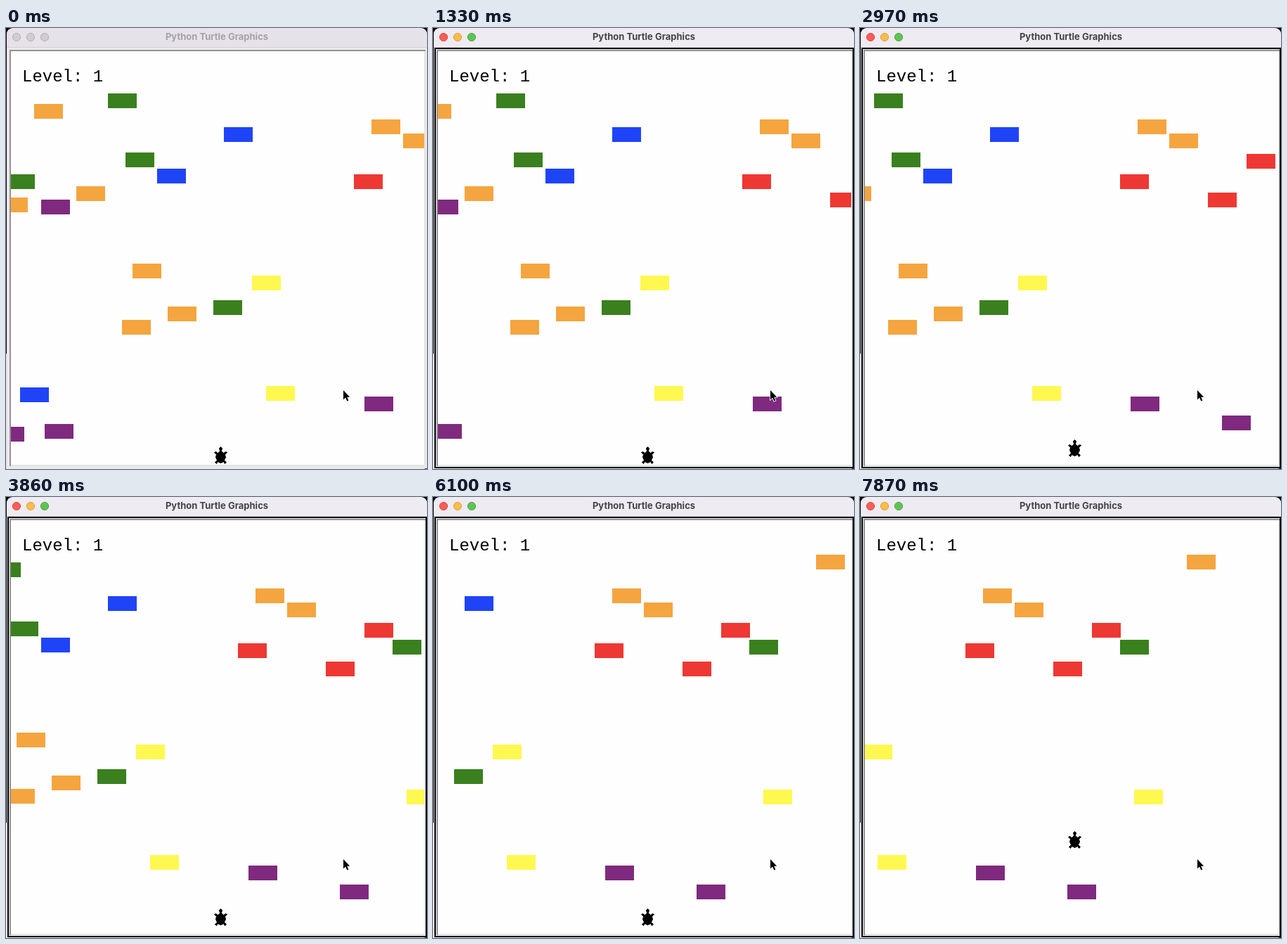
Animation, 599 px wide and 627 px high, one loop 8000 ms. Source, as an HTML page:

```html
<!DOCTYPE html>
<html lang="en">
<head>
<meta charset="utf-8">
<title>Turtle crossing</title>
<style>
  html, body { margin: 0; width: 100%; height: 100%; overflow: hidden; background: #000; }
  svg { display: block; width: 599px; height: 627px; }
  .chrome { fill: #e6e2ea; }
  .title { font: 700 13px Inter, sans-serif; text-anchor: middle; fill: #a5a1a7; }
  .level { font: 24px "Liberation Mono", "Courier New", monospace; white-space: pre; }
  .lights circle { fill: #d0ccd2; stroke: #b4b0b6; }
  .ring { fill: none; stroke: #ebe9eb; stroke-width: 2; }
  .active .chrome { fill: #eeebf2; }
  .active .title { fill: #454347; }
  .active .ring { stroke: #000; }
  .active .close { fill: #fd5d56; stroke: #de4a43; }
  .active .minimise { fill: #f8bd4c; stroke: #dba03a; }
  .active .zoom { fill: #5fc454; stroke: #4aa73f; }
</style>
</head>
<body>
<svg id="stage" viewBox="0 0 599 627">
  <defs>
    <clipPath id="view"><rect x="7" y="33" width="588" height="588"/></clipPath>
  </defs>

  <!-- window frame -->
  <rect y="463" width="2" height="164" fill="#dcdadd"/>
  <path d="M590 627L599 622V627Z" fill="#4a1d63"/>
  <path d="M1 627V10Q1 0 11 0H589Q599 0 599 10V621Q599 627 593 627Z" fill="#ebe9eb"/>
  <path class="chrome" d="M1 27V10Q1 0 11 0H589Q599 0 599 10V27Z"/>
  <path d="M1 27.5H599" stroke="#d5d2d7"/>
  <g class="lights">
    <circle class="close" cx="15" cy="13" r="5.6"/>
    <circle class="minimise" cx="35" cy="13" r="5.6"/>
    <circle class="zoom" cx="55" cy="13" r="5.6"/>
  </g>
  <text class="title" x="300" y="17">Python Turtle Graphics</text>
  <rect class="ring" x="3" y="29" width="595" height="596"/>
  <rect x="5" y="31" width="592" height="592" fill="#e4e3e4"/>
  <path d="M6 623V32H597" fill="none" stroke="#959395" stroke-width="2"/>
  <rect x="7" y="33" width="588" height="588" fill="#fefefe"/>

  <!-- game -->
  <g clip-path="url(#view)">
    <g id="cars" shape-rendering="crispEdges"></g>
    <path id="turtle" stroke="#000" d="M0-16L-2-14-1-10-4-7-7-9-9-8-6-5-7-1-5 3-8 6-6 8-4 5 0 7 4 5 6 8 8 6 5 3 7-1 6-5 9-8 7-9 4-7 1-10 2-14Z"/>
    <text class="level" x="23" y="76">Level: 1</text>
  </g>
  <path d="M480 515V528.4L483 525.6 485.3 530.6 487.4 529.7 485.2 524.7H489.2Z"
        stroke="#fff" stroke-width="1.6" paint-order="stroke"/>
</svg>
<script>
const LOOP = 8000, TICK = 148.6, STEP = 5, SPAWN_X = 580;

// colour: pairs of starting x and lane y
const lanes = {
  '#f4a53f': [[40, 108], [520, 130], [565, 150], [100, 225], [-10, 241],
              [180, 335], [230, 396], [165, 415], [810, 82]],
  '#3a801e': [[145, 93], [170, 177], [0, 208], [295, 387], [715, 203]],
  '#1f44f8': [[310, 141], [215, 200], [20, 511]],
  '#ee3833': [[495, 208], [620, 234], [675, 179]],
  '#fff850': [[350, 352], [370, 509], [735, 416]],
  '#7f2a7f': [[50, 244], [510, 524], [-15, 567], [55, 563], [640, 551]]
};

const stage = document.getElementById('stage');
const carLayer = document.getElementById('cars');
const turtle = document.getElementById('turtle');
const clamp = (v, lo, hi) => Math.min(hi, Math.max(lo, v));

function makeCar(fill, x, y) {
  const el = document.createElementNS(stage.namespaceURI, 'rect');
  const attrs = { x, y, width: 41, height: 21, fill };
  for (const key in attrs) el.setAttribute(key, attrs[key]);
  carLayer.append(el);
  return { el, x };
}

const cars = Object.entries(lanes).flatMap(([fill, spots]) =>
  spots.map(([x, y]) => makeCar(fill, x, y)));

function draw(time) {
  const tick = Math.floor((time + 9) / TICK);
  // four moves per three ticks, with a short slowdown near the start
  const moves = Math.floor(tick * 4 / 3 - 1.17 * clamp((tick - 4) / 10, 0, 1));
  for (const { el, x } of cars) {
    const left = x - moves * STEP;
    el.setAttribute('x', left);
    el.setAttribute('visibility', left > SPAWN_X ? 'hidden' : 'visible');
  }
  const hops = (tick >= 12 ? 1 : 0) + clamp(tick - 42, 0, 11);
  turtle.setAttribute('transform', `translate(305.5 ${611.5 - hops * 10})`);
  stage.classList.toggle('active', tick >= 2);
}

const start = performance.now();
function loop() {
  draw((performance.now() - start) % LOOP);
  requestAnimationFrame(loop);
}
loop();
</script>
</body>
</html>
```
